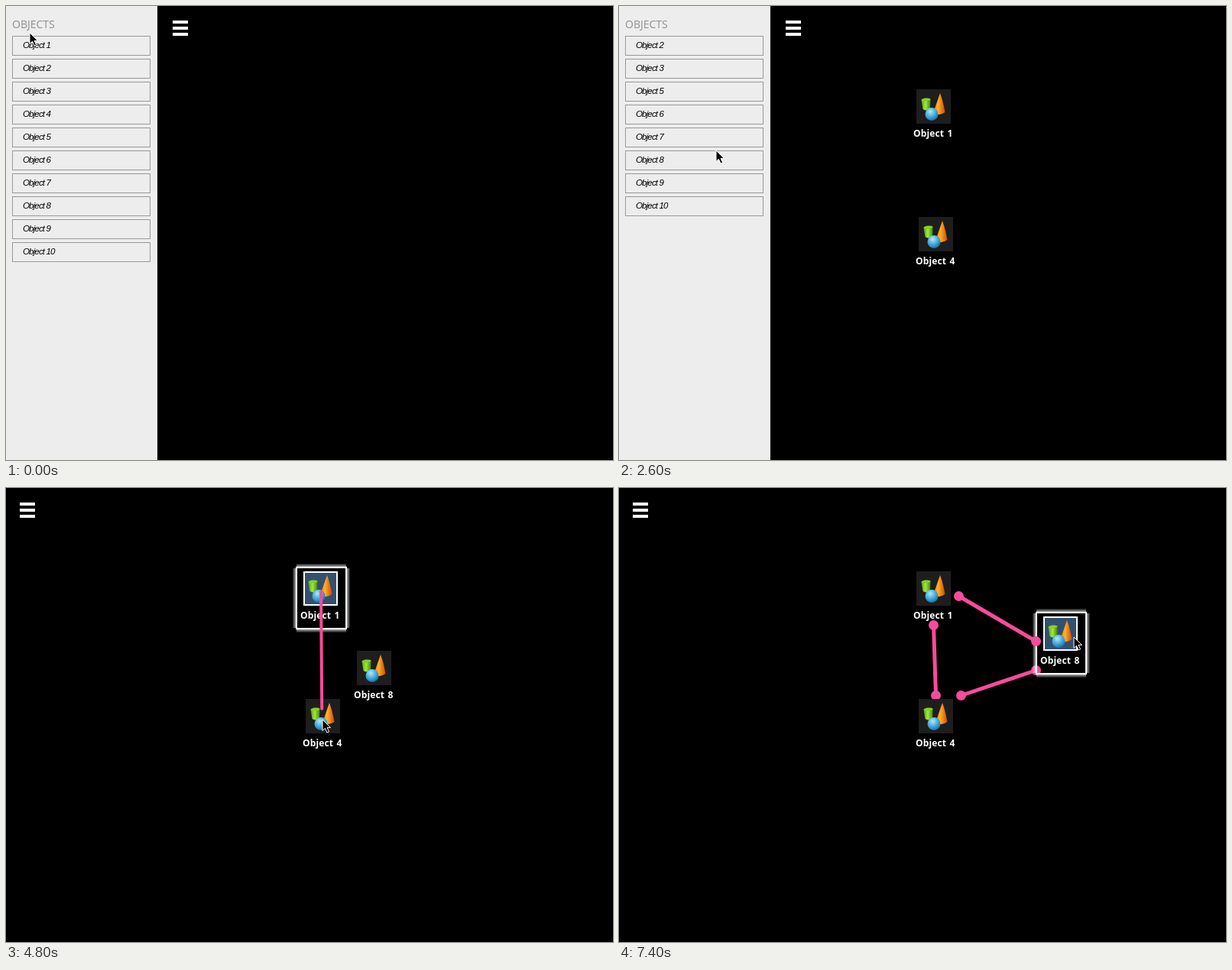
Recreate the animation shown at these times as an HTML page. Size 794 px wide and 594 px high, loop 7.6 s.

```html
<!DOCTYPE html>
<html lang="en">
<head>
<meta charset="utf-8">
<title>Linking objects</title>
<style>
  html, body { margin: 0; width: 100%; height: 100%; overflow: hidden; background: #000; }
  svg { display: block; width: 794px; height: 594px; }
  .title { font: 14px "Open Sans", sans-serif; fill: #909090; }
  .item { font: italic 11.5px "Liberation Sans", Arial, sans-serif; letter-spacing: -.85px; fill: #000; }
  .label { font: 700 12px "Open Sans", sans-serif; letter-spacing: .15px; word-spacing: 1px; fill: #fff; }
</style>
</head>
<body>
<svg viewBox="0 0 794 594">
  <defs>
    <linearGradient id="green">
      <stop offset="0" stop-color="#4fa30c"/><stop offset=".45" stop-color="#a5e83a"/><stop offset="1" stop-color="#3f8a08"/>
    </linearGradient>
    <linearGradient id="orange">
      <stop offset="0" stop-color="#f07a08"/><stop offset=".4" stop-color="#ffb02a"/><stop offset="1" stop-color="#d04a02"/>
    </linearGradient>
    <radialGradient id="blue" cx=".4" cy=".3" r=".7">
      <stop offset="0" stop-color="#b5e6fa"/><stop offset=".5" stop-color="#4fb4e2"/><stop offset="1" stop-color="#1a72ac"/>
    </radialGradient>
    <g id="solids">
      <path d="M31 5 L22 31 Q29 36 37.500 30 Q35 16 31 5Z" fill="url(#orange)"/>
      <path d="M6.500 14 L8.500 26 Q13 29 18 26 L18.500 13Z" fill="url(#green)"/>
      <ellipse cx="12.500" cy="13.500" rx="6" ry="2" fill="#86cf2c" transform="rotate(-5 12.500 13.500)"/>
      <circle cx="20" cy="32.500" r="8.500" fill="url(#blue)"/>
    </g>
    <path id="arrow" d="M0 0 V14.500 L3.400 11.300 L6 17 L8.600 15.900 L6.100 10.400 H10.500Z"/>
  </defs>
  <g id="scene"></g>
</svg>
<script>
const STEP = 200, STEPS = 38, PINK = '#f94b9b';
const CLOSE = 20, MOVE = 34;
const scene = document.getElementById('scene');

// pointer stops: step, x, y
const stops = [
  [0, 31, 35], [4, 88, 275], [6, 104, 52], [7, 396, 112], [10, 95, 112], [12, 430, 292],
  [13, 127, 189], [16, 478, 236], [19, 222, 28], [20, 406, 161], [24, 414, 303],
  [27, 430, 285], [28, 473, 230], [31, 481, 236], [33, 411, 131], [MOVE, 499, 240], [37, 595, 195]
];
// objects dragged out of the list, by id
const moved = {
  1: { home: [389, 109], grab: 6, drop: 8 },
  4: { home: [392, 276], grab: 10, drop: 13 },
  8: { home: [459, 213], grab: 13, drop: 17, end: [555, 168] }
};
const anchor = {
  top: [22.5, -4.5], bottom: [22.5, 70.5], left: [-9.5, 32.5], right: [55.5, 32.5],
  topRight: [55.5, -4.5], bottomLeft: [-9.5, 70.5]
};
const links = [
  { from: 1, to: 4, out: 'bottom', into: 'top', pick: 21, join: 25 },
  { from: 4, to: 8, out: 'topRight', into: 'bottomLeft', pick: 26, join: 30 },
  { from: 8, to: 1, out: 'left', into: 'right', pick: 31, join: 34 }
];

const add = (a, b) => [a[0] + b[0], a[1] + b[1]];
const mix = (a, b, k) => a.map((v, i) => v + (b[i] - v) * k);

function pointerAt(step) {
  const i = Math.max(1, stops.findIndex(s => s[0] >= step));
  const [[t0, ...a], [t1, ...b]] = [stops[i - 1], stops[i]];
  return mix(a, b, (step - t0) / (t1 - t0));
}

function place(id, step) {
  const { home, end = home } = moved[id];
  return mix(home, end, Math.min(1, Math.max(0, (step - MOVE) / 2)));
}

const rect = (x, y, w, h, fill, more = '') =>
  `<rect x="${x}" y="${y}" width="${w}" height="${h}" fill="${fill}" ${more}/>`;
const text = (x, y, cls, s) => `<text x="${x}" y="${y}" class="${cls}">${s}</text>`;
const line = (a, b, width) =>
  `<path d="M${a}L${b}" stroke="${PINK}" stroke-width="${width}" stroke-linecap="round"/>`;
const dot = p => `<circle cx="${p[0]}" cy="${p[1]}" r="6.500" fill="${PINK}"/>`;

function entry(id, x, y, w, bold) {
  const box = bold
    ? rect(x, y, w, 25, '#ededed', 'stroke="#999" stroke-width="2"')
    : rect(x + .5, y + .5, w - 1, 25, '#ededed', 'stroke="#999"');
  return box + text(x + 14, y + 16, 'item', 'Object ' + id);
}

function sidebar(step, [px, py]) {
  let out = rect(0, 0, 198, 594, '#ededed') + text(8, 29, 'title', 'OBJECTS');
  let dragged = '', y = 39;
  for (let id = 1; id <= 10; id++) {
    const m = moved[id];
    if (m && step >= m.drop) continue;
    if (m && step > m.grab) {
      const k = (step - m.grab) / (m.drop - m.grab);
      const [x, top] = mix([8, y], add(m.home, [-13, -12]), k);
      dragged = entry(id, x, top, 200, true);
    } else {
      const hover = px > 8 && px < 188 && py > y + 1 && py < y + 25;
      out += entry(id, 8, y, 181, hover);
    }
    y += 30;
  }
  return [out, dragged];
}

function glow(x, y, w, h) {
  let out = rect(x + 1, y + 1, w - 2, h - 2, 'none', 'stroke="#fff" stroke-width="2"');
  for (let i = 0; i < 4; i++) {
    const d = i + .5;
    out += `<path d="M${x + 1} ${y - d}h${w - 2}M${x + 1} ${y + h + d}h${w - 2}` +
      `M${x - d} ${y + 2}v${h - 4}M${x + w + d} ${y + 2}v${h - 4}" stroke="#fff" opacity="${.6 - i * .15}"/>`;
  }
  return out;
}

function node(id, [x, y], selected) {
  return (selected ? glow(x - 10, y - 6, 67, 82) : '') +
    rect(x, y, 45, 45, selected ? '#34506f' : '#1e1e1e') +
    `<use href="#solids" x="${x}" y="${y}"/>` +
    (selected ? rect(x + 1, y + 1, 43, 43, 'none', 'stroke="#fff" stroke-width="2"') : '') +
    text(x - 4, y + 62, 'label', 'Object ' + id);
}

function draw(step) {
  const tip = pointerAt(step), open = step < CLOSE;
  const [list, dragged] = open ? sidebar(step, tip) : ['', ''];
  const active = links.findLast(l => step >= l.pick);
  let below = '', nodes = '', above = '', bars = '';

  for (let i = 0; i < 3; i++) bars += rect(open ? 218 : 18, 19 + i * 8, 20, 4, '#fff');

  for (const l of links) {
    if (step < l.join) continue;
    const a = add(place(l.from, step), anchor[l.out]), b = add(place(l.to, step), anchor[l.into]);
    const drawn = line(a, b, 5) + dot(a) + dot(b);
    if (l === active) above += drawn; else below += drawn;
  }
  for (const id in moved) {
    if (step >= moved[id].drop) nodes += node(id, place(id, step), active && active.from == id);
  }
  // a new link trails the pointer
  if (active && step > active.pick && step < active.join) {
    above += line(add(place(active.from, step), [23, 27]), mix(pointerAt(step - 1), tip, .6), 4);
  }
  scene.innerHTML = list + bars + below + nodes + above + dragged +
    `<use href="#arrow" x="${tip[0]}" y="${tip[1]}" fill="#000" stroke="#fff" stroke-linejoin="round"/>`;
}

const start = performance.now();
let shown = -1;
function tick() {
  const step = Math.floor((performance.now() - start) / STEP) % STEPS;
  if (step !== shown) draw(shown = step);
  requestAnimationFrame(tick);
}
tick();
</script>
</body>
</html>
```
